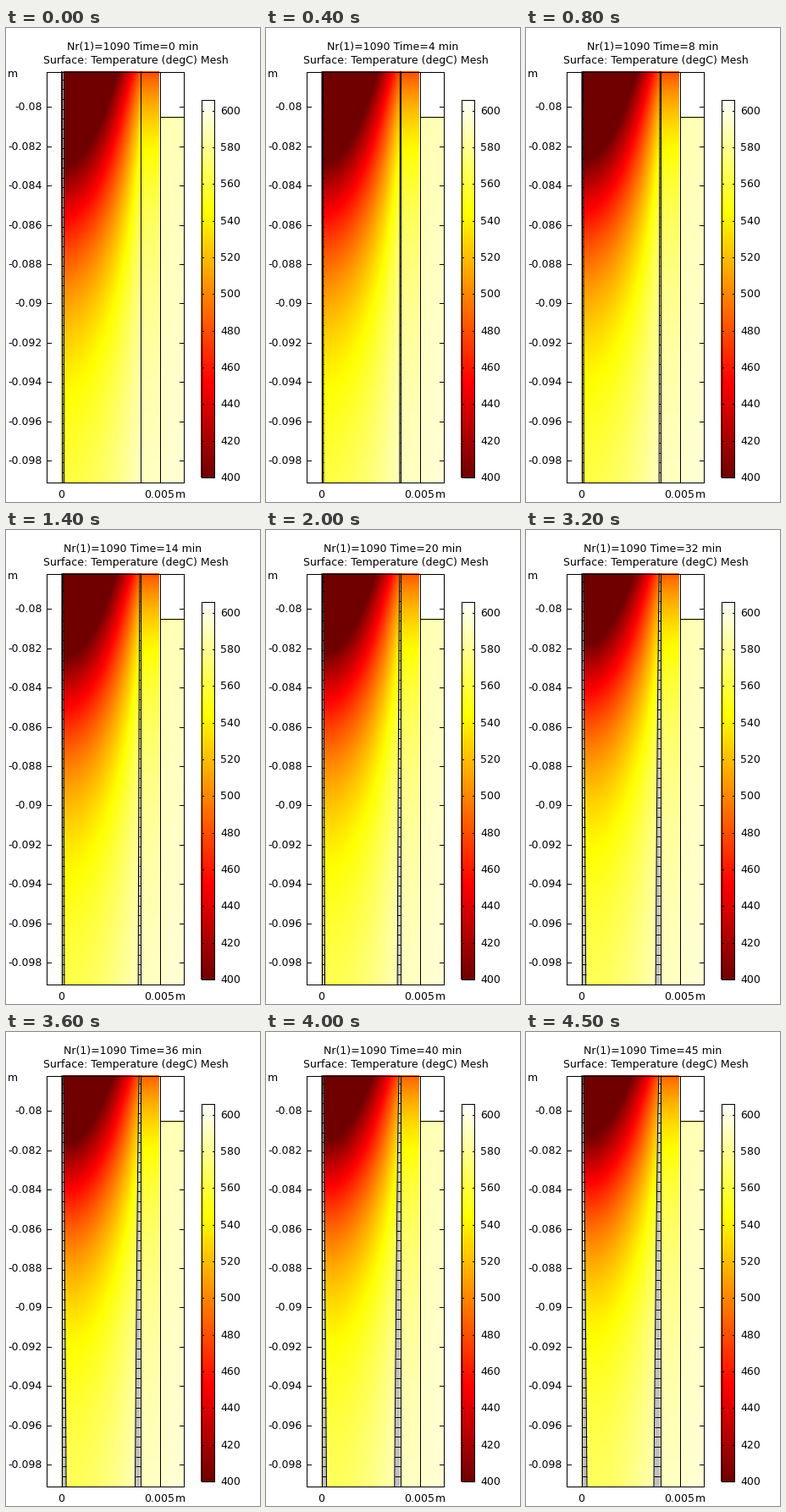
Recreate the animation shown at these times as a matplotlib script. Size 300 px wide and 560 px high, loop 4.6 s.

```python
import numpy as np
import matplotlib.pyplot as plt
from matplotlib.animation import FuncAnimation
from matplotlib.collections import LineCollection
from matplotlib.colors import LinearSegmentedColormap
from matplotlib.patches import Polygon

W, H, DPI = 300, 560, 100
FRAMES, INTERVAL = 46, 100
LEFT, RIGHT, TOP, BOTTOM = 47, 209, 51, 536
INNER, WALL, OUTER, STEP = 65, 158, 181, 104   # layer borders and step height
PX = 72 / DPI                                  # one pixel in points
T_MIN, T_MAX = 400, 606

plt.rcParams.update({"font.family": "DejaVu Sans", "font.size": 9})

thermal = LinearSegmentedColormap.from_list("thermal", [
    (0, (0.44, 0, 0)), (0.25, (1, 0, 0)), (0.70, (1, 1, 0)), (1, (1, 1, 1))], N=1024)
thermal.set_bad((1, 1, 1, 0))

fig = plt.figure(figsize=(W / DPI, H / DPI), dpi=DPI, facecolor="white")
ax = fig.add_axes([0, 0, 1, 1])
ax.set_xlim(0, W)
ax.set_ylim(H, 0)
ax.axis("off")


def line(x0, y0, x1, y1, z=4):
    ax.plot([x0 + 0.5, x1 + 0.5], [y0 + 0.5, y1 + 0.5], color="black", lw=PX,
            solid_capstyle="projecting", snap=True, zorder=z)


def box(x0, y0, x1, y1):
    for seg in ((x0, y0, x1, y0), (x1, y0, x1, y1), (x0, y1, x1, y1), (x0, y0, x0, y1)):
        line(*seg)


def label(x, y, s, ha="center"):
    return ax.text(x, y, s, ha=ha, va="baseline", color="black")


xs = np.arange(INNER, RIGHT + 1) + 0.5
ys = np.arange(TOP, BOTTOM + 1) + 0.5
X, Y = np.meshgrid(xs, ys)


def core_temp(y):
    d = y - TOP
    return 575 - 272 * np.exp(-0.007 * d + 0.52 * (1 - np.exp(-d / 100)))


def wall_temp(y, t):
    d = y - TOP
    return 600 - 72 * np.exp(-d / 75) - 50 * np.exp(-d / 280) + 0.2 * t * np.exp(-d / 100)


def field(t):
    """Temperature in degC on the pixel grid after t minutes."""
    rise = t * (0.8 + 0.6 * np.clip((Y - 130) / 232, 0, 1))
    a, b = core_temp(Y + rise), wall_temp(Y, t)
    u = np.clip((X - INNER - 2) / (WALL - INNER - 2), 0, 1)
    temp = a + (b - a) * u ** 1.8
    temp += 10 * t / 45 * np.exp(-(X - INNER - 2) / 7)
    jacket = 586 + 8 * (Y - TOP) / (BOTTOM - TOP) + (X - OUTER) / 14
    temp = np.where(X > OUTER, jacket, temp)
    return np.ma.masked_where((X > OUTER) & (Y < STEP), temp)


surface = ax.imshow(field(0), cmap=thermal, vmin=T_MIN, vmax=T_MAX,
                    extent=(INNER, RIGHT + 1, BOTTOM + 1, TOP),
                    interpolation="nearest", aspect="auto", zorder=1)

# Colour bar
ramp = np.linspace(T_MAX, T_MIN, 447)[:, None]
ax.imshow(ramp, cmap=thermal, vmin=T_MIN, vmax=T_MAX, extent=(230, 246, 531, 84),
          interpolation="nearest", aspect="auto", zorder=1)
ax.set_xlim(0, W)
ax.set_ylim(H, 0)
box(230, 84, 245, 530)
for k in range(11):
    y = round(530 - 43.33 * k)
    line(230, y, 232, y)
    line(243, y, 245, y)
    label(253, y + 5, str(400 + 20 * k), "left")

# Plot frame, ticks and borders
box(LEFT, TOP, RIGHT, BOTTOM)
for k in range(10):
    y = round(92.3 + 46.4 * k)
    line(LEFT, y, LEFT + 5, y)
    line(RIGHT - 5, y, RIGHT, y)
    label(43, y + 5, f"{-0.08 - 0.002 * k:.3f}".rstrip("0"), "right")
line(OUTER, TOP, OUTER, BOTTOM)
line(OUTER, STEP, RIGHT, STEP)
label(65.5, 555, "0")
label(181.5, 555, "0.005")
label(200, 555, "m", "left")
label(2, 58, "m", "left")

title = label(149.5, 26, "")
label(153, 42, "Surface: Temperature (degC) Mesh")

rungs = np.arange(BOTTOM + 0.5, TOP, -11.6)


class Strip:
    """Meshed layer that thickens from a fixed edge."""

    def __init__(self, x, side, width):
        self.x, self.side, self.width = x + 0.5, side, width
        self.fill = ax.add_patch(Polygon([(0, 0)] * 4, fc="#c0c0c0", ec="none", zorder=2))
        self.mesh = ax.add_collection(
            LineCollection([], colors="black", linewidths=PX, zorder=3))

    def update(self, t):
        y = np.linspace(TOP, BOTTOM + 1, 60)
        edge = lambda v: self.x + self.side * self.width(t, (v - TOP) / (BOTTOM - TOP))
        inner = np.column_stack([edge(y), y])
        outer = np.column_stack([np.full_like(y, self.x), y])
        self.fill.set_xy(np.vstack([inner, outer[::-1]]))
        cross = [[(self.x, v), (edge(v), v)] for v in rungs]
        self.mesh.set_segments([inner, outer] + cross)


strips = [
    Strip(INNER, 1, lambda t, s: 2 + 0.1 * t * (0.1 + 0.9 * s)),
    Strip(WALL, -1, lambda t, s: 0.168 * t * (0.2 + 0.8 * s ** 0.7)),
]


def update(t):
    surface.set_data(field(t))
    for strip in strips:
        strip.update(t)
    title.set_text(f"Nr(1)=1090 Time={t} min")
    return [surface, title]


anim = FuncAnimation(fig, update, frames=FRAMES, interval=INTERVAL,
                     repeat=True, repeat_delay=0, blit=False)
plt.show()
```
